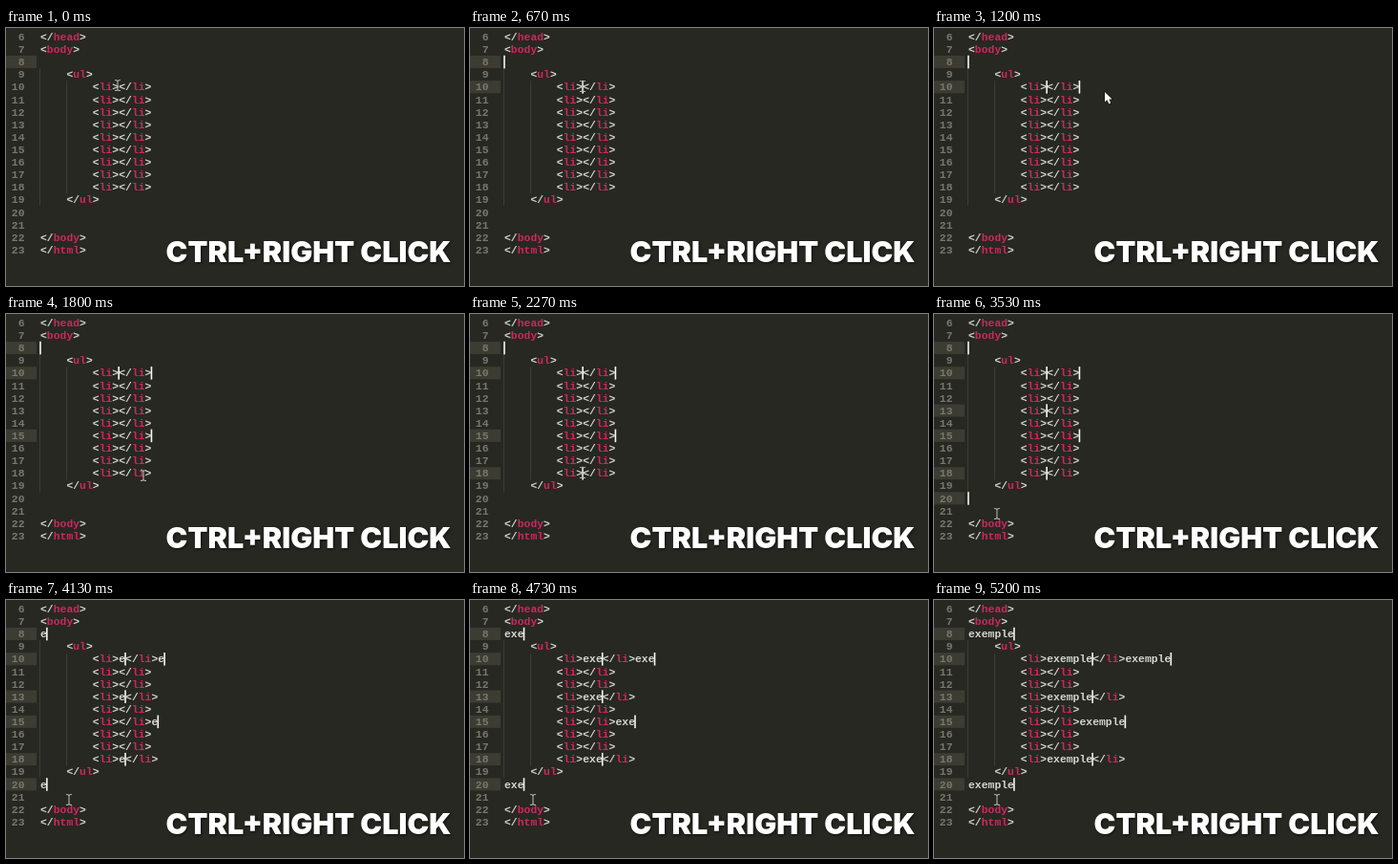
An HTML page with a canvas for the animation above (5390 ms loop, 480 px wide and 270 px high).

```html
<!DOCTYPE html>
<html lang="en">
<head>
<meta charset="utf-8">
<title>Multiple carets</title>
<style>
html, body { margin: 0; width: 100%; height: 100%; overflow: hidden; background: #272822; }
canvas { display: block; width: 480px; height: 270px; }
</style>
</head>
<body>
<canvas id="stage" width="480" height="270"></canvas>
<script>
const ctx = document.getElementById('stage').getContext('2d');
const LOOP = 5390, FPS = 15;
const CHAR = 6.85, LINE = 13.12, LEFT = 36;
const CODE_FONT = 'bold 11.42px "Liberation Mono", monospace';
const TITLE_FONT = '900 30.6px Inter, sans-serif';
const COLORS = {
  bg: '#272822', text: '#d6d6d0', tag: '#cc2860',
  number: '#77786f', active: '#3d3c32', guide: '#3b3c34'
};

const WORD = 'exemple';
const KEYS = [4000, 4267, 4467, 4800, 5067, 5133, 5200];

// Carets: line, slot within the line, moment of the click
const CARETS = [
  { line: 8, slot: 0, at: -800 },
  { line: 10, slot: 0, at: 667 },
  { line: 10, slot: 1, at: 933 },
  { line: 15, slot: 1, at: 1467 },
  { line: 18, slot: 0, at: 2067 },
  { line: 13, slot: 0, at: 2800 },
  { line: 20, slot: 0, at: 3170 }
];

// Pointer stops: time, x, y
const PATH = [
  [0, 117, 60], [667, 118, 61], [930, 152, 62], [1190, 180, 73], [1250, 180, 73],
  [1460, 153, 127], [1580, 153, 128], [1800, 144, 169], [2000, 118, 167],
  [2300, 118, 166], [2660, 117, 100], [2860, 117, 100], [3150, 40, 194],
  [3220, 40, 194], [3500, 66, 209]
];

const clamp = v => Math.max(0, Math.min(1, v));
const ease = p => p * p * (3 - 2 * p);
const lineMid = n => 9.2 + (n - 6) * LINE;

function pointerAt(t) {
  for (let i = 1; i < PATH.length; i++) {
    const [t0, x0, y0] = PATH[i - 1], [t1, x1, y1] = PATH[i];
    if (t < t1) {
      const p = ease((t - t0) / (t1 - t0));
      return [x0 + (x1 - x0) * p, y0 + (y1 - y0) * p];
    }
  }
  return PATH[PATH.length - 1].slice(1);
}

function caretAlpha(t) {
  const actions = CARETS.map(c => c.at).concat(KEYS).filter(a => a <= t + 1);
  const age = Math.max(0, t - Math.max(...actions)) % 1060;
  return age < 780 ? 1 - clamp((age - 500) / 130) : clamp((age - 930) / 130);
}

function put(s, x, n, color) {
  ctx.fillStyle = color;
  ctx.fillText(s, x, lineMid(n) + 3.7);
  return x + s.length * CHAR;
}

function putTag(tag, x, n) {
  for (const part of tag.match(/[<>\/]+|\w+/g)) {
    x = put(part, x, n, /\w/.test(part) ? COLORS.tag : COLORS.text);
  }
  return x;
}

function contentOf(n) {
  if (n >= 10 && n <= 18) return [2, ['<li>', 0, '</li>', 1]];
  return {
    6: [0, ['</head>']], 7: [0, ['<body>']], 8: [0, [0]], 9: [1, ['<ul>']],
    19: [1, ['</ul>']], 20: [0, [0]], 22: [0, ['</body>']], 23: [0, ['</html>']]
  }[n] || [0, []];
}

function drawLine(n, t, typed, alpha) {
  const carets = CARETS.filter(c => c.line === n && c.at <= t + 1);
  if (carets.length) {
    ctx.fillStyle = COLORS.active;
    ctx.fillRect(0, lineMid(n) - 6.5, 32, 13);
  }
  const label = String(n);
  put(label, 19.5 - label.length * CHAR, n, COLORS.number);

  const [indent, parts] = contentOf(n);
  let x = LEFT + indent * 4 * CHAR;
  for (const part of parts) {
    if (typeof part === 'string') {
      x = putTag(part, x, n);
    } else if (carets.some(c => c.slot === part)) {
      x = put(typed, x, n, COLORS.text);
      ctx.globalAlpha = alpha;
      ctx.fillStyle = '#f8f8f0';
      ctx.fillRect(x - 0.8, lineMid(n) - 6.7, 1.6, 13.6);
      ctx.globalAlpha = 1;
    }
  }
}

function drawGuides() {
  ctx.fillStyle = COLORS.guide;
  ctx.fillRect(35, lineMid(9) - 6.5, 1, LINE * 11);
  ctx.fillRect(63, lineMid(10) - 6.5, 1, LINE * 9);
}

function drawBeam(x, y) {
  ctx.strokeStyle = '#b4b4ae';
  ctx.lineWidth = 1.1;
  ctx.beginPath();
  for (const s of [-1, 1]) {
    ctx.moveTo(x - 3, y + s * 5.5);
    ctx.quadraticCurveTo(x, y + s * 5.5, x, y + s * 4);
    ctx.quadraticCurveTo(x, y + s * 5.5, x + 3, y + s * 5.5);
  }
  ctx.moveTo(x, y - 5);
  ctx.lineTo(x, y + 5);
  ctx.stroke();
}

function drawArrow(x, y) {
  ctx.beginPath();
  ctx.moveTo(x, y);
  for (const [dx, dy] of [[0, 10.5], [2.5, 8.3], [4.4, 12.4], [6.2, 11.6], [4.4, 7.6], [7.6, 7.5]]) {
    ctx.lineTo(x + dx, y + dy);
  }
  ctx.closePath();
  ctx.strokeStyle = '#111';
  ctx.lineWidth = 1.2;
  ctx.stroke();
  ctx.fillStyle = '#fff';
  ctx.fill();
}

function drawTitle() {
  ctx.font = TITLE_FONT;
  ctx.textAlign = 'right';
  ctx.shadowColor = 'rgba(0,0,0,.6)';
  ctx.shadowBlur = 3;
  ctx.shadowOffsetX = ctx.shadowOffsetY = 1;
  ctx.fillStyle = '#fff';
  ctx.fillText('CTRL+RIGHT CLICK', 466.5, 244.5);
  ctx.shadowColor = 'transparent';
  ctx.textAlign = 'left';
}

function draw(t) {
  ctx.fillStyle = COLORS.bg;
  ctx.fillRect(0, 0, 480, 270);
  drawGuides();
  ctx.font = CODE_FONT;
  const typed = WORD.slice(0, KEYS.filter(k => k <= t + 1).length);
  const alpha = caretAlpha(t);
  for (let n = 6; n <= 23; n++) drawLine(n, t, typed, alpha);
  drawTitle();
  const [x, y] = pointerAt(t);
  if (x > 165) drawArrow(x - 1, y - 6);
  else drawBeam(x, y);
}

const start = performance.now();
function tick() {
  const t = (performance.now() - start) % LOOP;
  // Steps fall on whole hundredths of a second, up to 4 ms early
  draw(Math.floor((t + 4) * FPS / 1000) * 1000 / FPS);
  requestAnimationFrame(tick);
}
tick();
</script>
</body>
</html>
```
